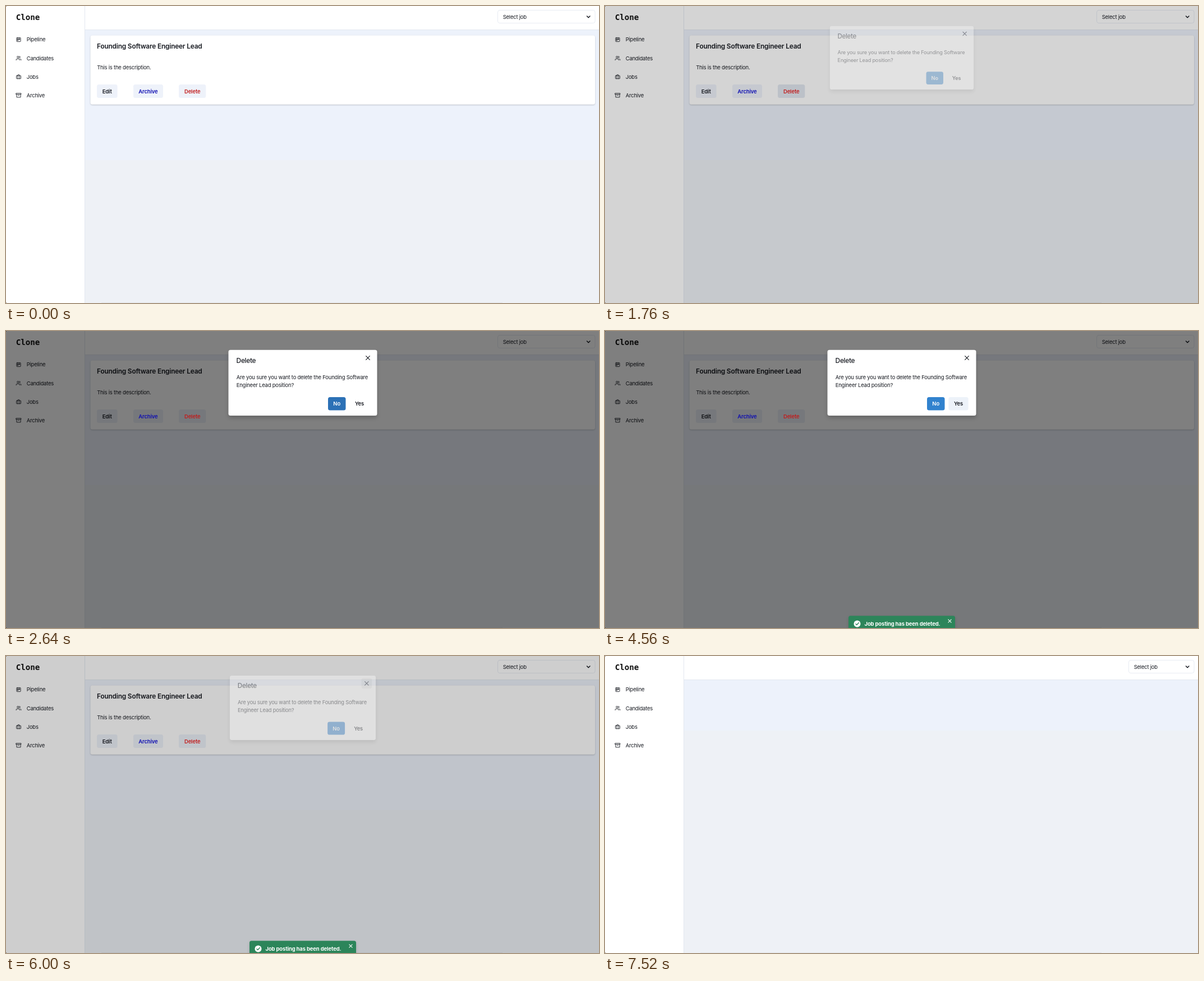
Animation, 1057 px wide and 530 px high, one loop 8 s. Source, as an HTML page with a canvas:

```html
<!DOCTYPE html>
<html lang="en">
<head>
<meta charset="utf-8">
<title>Job board</title>
<style>
  html, body { margin: 0; width: 100%; height: 100%; overflow: hidden; background: #fff; }
  canvas { display: block; width: 1057px; height: 530px; }
</style>
</head>
<body>
<canvas id="stage"></canvas>
<script>
const W = 1057, H = 530, LOOP = 8000;
const REM = 9.46;
const INK = '#171a21', LINE = '#e2e8f0';
const SANS = 'Inter, sans-serif', MONO = '"DejaVu Sans Mono", monospace';

const dpr = window.devicePixelRatio || 1;
function setup(canvas) {
  canvas.width = W * dpr;
  canvas.height = H * dpr;
  const c = canvas.getContext('2d');
  c.scale(dpr, dpr);
  return c;
}
const main = setup(document.getElementById('stage'));
const layerCanvas = document.createElement('canvas');
const layer = setup(layerCanvas);
let ctx = main;

// Timing helpers
const clamp = v => Math.max(0, Math.min(1, v));
const span = (t, start, length) => clamp((t - start) / length);
function bezier(x1, y1, x2, y2) {
  const at = (a, b, s) => 3 * a * s * (1 - s) ** 2 + 3 * b * s * s * (1 - s) + s ** 3;
  return x => {
    if (x <= 0 || x >= 1) return clamp(x);
    let lo = 0, hi = 1;
    for (let i = 0; i < 24; i++) {
      const mid = (lo + hi) / 2;
      if (at(x1, x2, mid) < x) lo = mid; else hi = mid;
    }
    return at(y1, y2, lo);
  };
}
const easeOut = bezier(0, 0, 0.2, 1);
const easeIn = bezier(0.4, 0, 1, 1);
const easeInOut = bezier(0.4, 0, 0.2, 1);

function mix(a, b, k) {
  return `rgb(${a.map((v, i) => Math.round(v + (b[i] - v) * k)).join()})`;
}

// Drawing helpers
function rect(x, y, w, h, color) {
  ctx.fillStyle = color;
  ctx.fillRect(x, y, w, h);
}

function box(x, y, w, h, color, radius = 3.5) {
  ctx.beginPath();
  ctx.roundRect(x, y, w, h, radius);
  ctx.fillStyle = color;
  ctx.fill();
}

function shadowBox(x, y, w, h, color, drop, blur, alpha) {
  ctx.save();
  ctx.shadowColor = `rgba(0,0,0,${alpha})`;
  ctx.shadowBlur = blur * dpr;
  ctx.shadowOffsetY = drop * dpr;
  box(x, y, w, h, color);
  ctx.restore();
}

// Text is placed by the middle of its capitals.
function text(str, x, y, { size = REM, weight = 400, color = INK, align = 'left', font = SANS } = {}) {
  const tracking = font === MONO ? 0 : weight > 500 ? -0.014 : -0.022;
  ctx.font = `${weight} ${size}px ${font}`;
  ctx.letterSpacing = `${tracking * size}px`;
  ctx.textAlign = align;
  ctx.fillStyle = color;
  ctx.fillText(str, x, y + size * 0.364);
}

function stroke(points, width, color) {
  ctx.beginPath();
  points.forEach(([x, y], i) => i ? ctx.lineTo(x, y) : ctx.moveTo(x, y));
  ctx.lineWidth = width;
  ctx.lineCap = ctx.lineJoin = 'round';
  ctx.strokeStyle = color;
  ctx.stroke();
}

function cross(x, y, r, width, color) {
  stroke([[x - r, y - r], [x + r, y + r]], width, color);
  stroke([[x + r, y - r], [x - r, y + r]], width, color);
}

function label(str, x, y, color) {
  text(str, x, y, { weight: 600, color, align: 'center' });
}

// Draws a group on its own layer, then fades it as a whole.
function group(alpha, draw) {
  if (alpha <= 0) return;
  layer.clearRect(0, 0, W, H);
  layer.save();
  ctx = layer;
  draw();
  layer.restore();
  ctx = main;
  ctx.globalAlpha = alpha;
  ctx.drawImage(layerCanvas, 0, 0, W, H);
  ctx.globalAlpha = 1;
}

// Sidebar icons on a 24 unit grid
const NAV = [
  ['Pipeline', 'M5 3h14a2 2 0 0 1 2 2v14a2 2 0 0 1-2 2H5a2 2 0 0 1-2-2V5a2 2 0 0 1 2-2z M7 7h3v9H7z M14 7h3v5h-3z'],
  ['Candidates', 'M17 21v-2a4 4 0 0 0-4-4H5a4 4 0 0 0-4 4v2 M13 7a4 4 0 1 1-8 0a4 4 0 1 1 8 0z M23 21v-2a4 4 0 0 0-3-3.87 M16 3.13a4 4 0 0 1 0 7.75'],
  ['Jobs', 'M4 7h16a2 2 0 0 1 2 2v10a2 2 0 0 1-2 2H4a2 2 0 0 1-2-2V9a2 2 0 0 1 2-2z M16 21V5a2 2 0 0 0-2-2h-4a2 2 0 0 0-2 2v16'],
  ['Archive', 'M21 8v13H3V8 M1 3h22v5H1z M10 12h4']
].map(([name, d]) => ({ name, path: new Path2D(d) }));

function drawSidebar() {
  text('Clone', 17.7, 19.7, { size: 14.2, weight: 700, color: '#111', font: MONO });
  NAV.forEach(({ name, path }, i) => {
    const y = 60 + i * 33.1;
    ctx.save();
    ctx.translate(17.8, y - REM / 2);
    ctx.scale(REM / 24, REM / 24);
    ctx.lineWidth = 2.2;
    ctx.lineCap = ctx.lineJoin = 'round';
    ctx.strokeStyle = INK;
    ctx.stroke(path);
    ctx.restore();
    text(name, 36.7, y);
  });
}

function drawSelect(x) {
  ctx.beginPath();
  ctx.roundRect(x + 0.5, 7.5, 1049.5 - x, 23, 3.5);
  ctx.lineWidth = 0.8;
  ctx.strokeStyle = LINE;
  ctx.stroke();
  text('Select job', x + 9.7, 19.2);
  stroke([[1035.5, 18], [1038.2, 20.7], [1040.9, 18]], 1.5, INK);
}

function drawFrame(bandEnd) {
  rect(0, 0, W, H, '#fff');
  rect(141, 43, W - 141, H - 43, '#eef1f6');
  rect(141, 43, W - 141, bandEnd - 43, '#edf2fb');
  rect(140, 0, 1, H, LINE);
  rect(141, 42, W - 141, 1, LINE);
  rect(170, 529, 715, 1, 'rgba(0,0,0,0.05)');
  rect(0, 0, 1, 1, '#777');
  rect(0, 529, 1, 1, '#777');
}

function drawCard(hover) {
  const idle = [238, 242, 250];
  shadowBox(150.5, 52.5, 899.5, 123.3, '#fff', 1, 2.5, 0.2);
  text('Founding Software Engineer Lead', 162, 72, { size: 11.83, weight: 600 });
  text('This is the description.', 162.2, 109.8);
  box(162, 140, 36.6, 24, mix(idle, idle, 0));
  box(227, 140, 53, 24, mix(idle, idle, 0));
  box(308, 140, 48.3, 24, mix(idle, [226, 232, 240], hover));
  label('Edit', 180.2, 152.3, INK);
}

function drawDialog(scale, s) {
  ctx.translate(529, 92.5);
  ctx.scale(scale, scale);
  ctx.translate(-529, -92.5);
  shadowBox(396.5, 33.8, 265, 117.2, '#fff', 4, 7, 0.2);
  text('Delete', 410.6, 52.5, { size: 11.83, weight: 500 });
  if (s.closeHover) box(635.5, 38.5, 19, 19, 'rgba(0,0,0,0.08)');
  cross(645, 48, 3.3, 1.2, INK);
  text('Are you sure you want to delete the Founding Software', 410.7, 82.8);
  text('Engineer Lead position?', 410.7, 97);
  box(574, 118, 31.5, 23.5, mix([49, 130, 206], [43, 108, 176], s.noHover));
  label('No', 589.7, 129.9, '#fff');
  if (s.yesColor) box(612.3, 118, 35.3, 23.5, s.yesColor);
  label('Yes', 630, 129.9, INK);
}

function drawToast(dy) {
  ctx.translate(0, dy);
  const green = '#2c855a';
  shadowBox(434, 508.2, 190, 34, green, 2, 5, 0.15);
  ctx.beginPath();
  ctx.arc(449.5, 522.4, 6, 0, Math.PI * 2);
  ctx.fillStyle = '#fff';
  ctx.fill();
  stroke([[446.8, 522.6], [448.8, 524.5], [452.3, 520.5]], 1.3, green);
  text('Job posting has been deleted.', 462.5, 522.6, { weight: 700, color: '#fff' });
  cross(614.5, 517.5, 2.6, 1.1, '#fff');
}

function render(t) {
  const RELOAD = 7000, READY = 7480;
  const hasCard = t < RELOAD;
  drawFrame(hasCard ? 275 : 133);
  if (hasCard || t >= READY) {
    drawSidebar();
    drawSelect(hasCard ? 876 : 933);
  }
  if (!hasCard) return;

  const hover = easeOut(span(t, 1410, 200)) * (1 - span(t, 1800, 120));
  drawCard(hover);

  const enter = easeOut(span(t, 1738, 200));
  const exit = easeIn(span(t, 5905, 130));
  const shown = enter * (1 - exit);
  if (shown > 0) rect(0, 0, W, H, `rgba(0,0,0,${0.5 * shown})`);
  label('Archive', 253.4, 152.3, '#0e0eb2');
  label('Delete', 332.2, 152.3, '#c21c1c');

  const pressed = t >= 3520 && t < 3640;
  const state = {
    noHover: t < 2630 ? 0 : 1 - span(t, 2610, 150),
    yesColor: t >= 3280 && t < 5920 ? (pressed ? '#e2e8f0' : '#edf2f9') : null,
    closeHover: t >= 5520
  };
  const scale = 0.95 + 0.05 * enter - 0.03 * exit;
  group(shown, () => drawDialog(scale, state));

  const rise = easeInOut(span(t, 3560, 400));
  group(rise, () => drawToast(14.2 * (1 - rise)));
}

const began = performance.now();
function tick() {
  render((performance.now() - began) % LOOP);
  requestAnimationFrame(tick);
}
tick();
</script>
</body>
</html>
```
